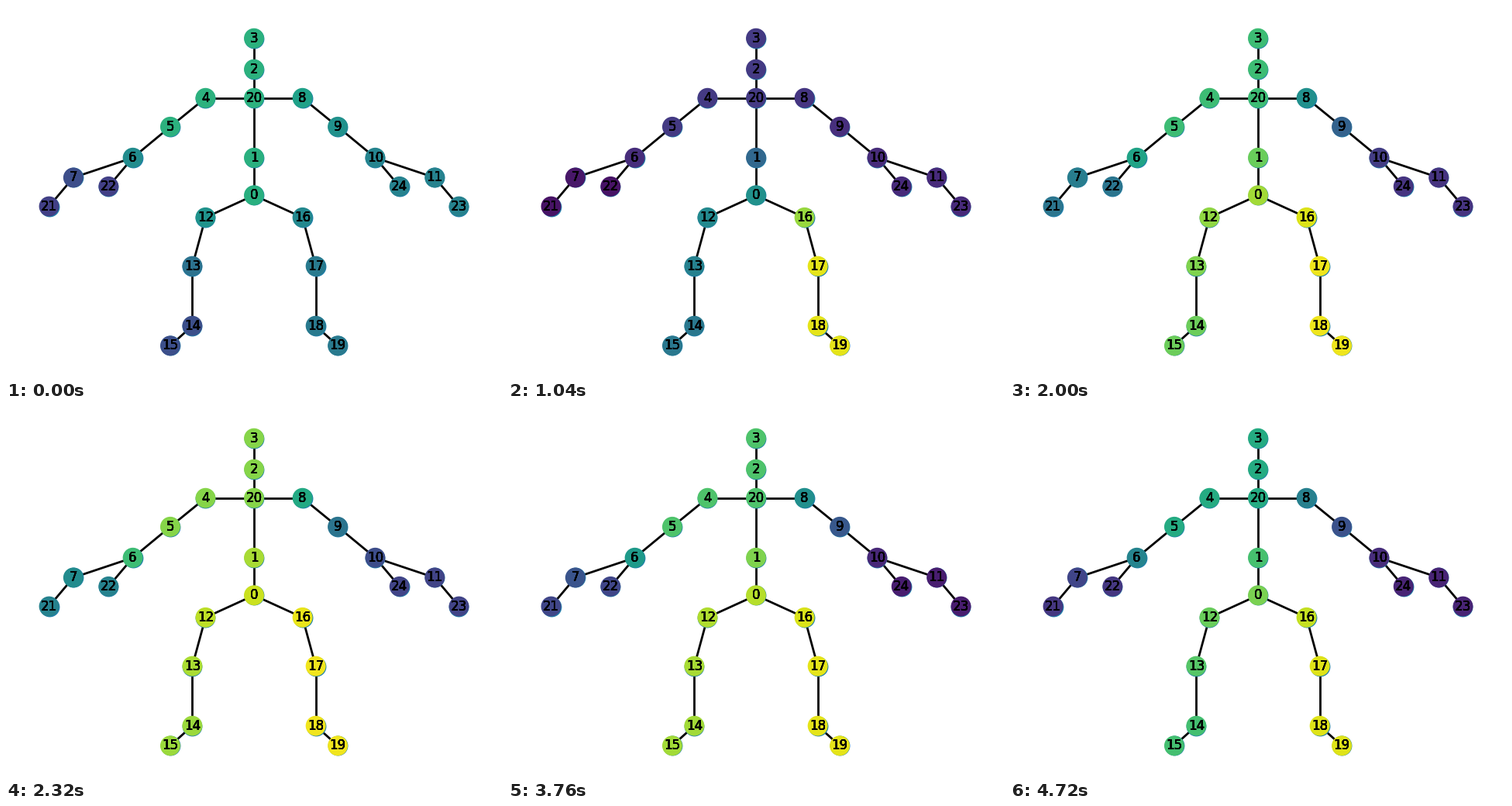
A matplotlib script for the animation above (4800 ms loop, 640 by 480 pixels).

```python
from itertools import pairwise

import numpy as np
import matplotlib.pyplot as plt
from matplotlib.animation import FuncAnimation
from matplotlib.collections import LineCollection

W, H, DPI = 640, 480, 100
FRAMES, INTERVAL = 60, 80
MARGIN = 1.21      # stage size relative to the skeleton
LAYERS = 7         # stacked labels give heavy, crisp digits

# Skeleton on an integer grid: x outwards from the body axis, y down
SPAN_X, SPAN_Y = 186, 139
SPINE = [(0, 71), (0, 54), (0, 14), (0, 0)]
CHEST = (0, 27)
ARM = [(22, 27), (38, 40), (55, 54), (82, 63), (93, 76), (66, 67)]
LEG = [(22, 81), (28, 103), (28, 130), (38, 139)]

SPINE_IDS, CHEST_ID = [0, 1, 2, 3], 20
LEFT_ARM, RIGHT_ARM = [4, 5, 6, 7, 21, 22], [8, 9, 10, 11, 23, 24]
LEFT_LEG, RIGHT_LEG = [12, 13, 14, 15], [16, 17, 18, 19]

CHAINS = [
    [3, 2, 20, 1, 0],
    [20, *LEFT_ARM[:5]], [6, 22],
    [20, *RIGHT_ARM[:5]], [10, 24],
    [0, *LEFT_LEG], [0, *RIGHT_LEG],
]

# Activity of the main body parts at a few key steps
KEYS = [0, 7, 13, 21, 29, 47, 59]
PARTS = {
    "chest": [.64, .67, .17, .55, .82, .72, .61],
    "hip": [.63, .66, .50, .80, .92, .89, .80],
    "left hand": [.19, .08, .05, .34, .44, .21, .16],
    "right hand": [.44, .47, .12, .10, .20, .08, .10],
    "left foot": [.24, .28, .40, .70, .85, .86, .70],
    "right foot": [.41, .74, .96, .97, .98, .96, .95],
}

# Joints, root part, end part, and how far each joint follows the end
BLENDS = [
    ([2, 3, 20], "chest", "chest", 0),
    ([0, 1], "hip", "chest", [0, .5]),
    (LEFT_ARM, "chest", "left hand", [0, 0, .35, .9, 1, 1]),
    (RIGHT_ARM, "chest", "right hand", [.35, .7, .95, 1, 1, 1]),
    (LEFT_LEG, "hip", "left foot", [.3, .65, 1, 1]),
    (RIGHT_LEG, "hip", "right foot", [.75, 1, 1, 1]),
]


def joint_positions():
    grid = np.zeros((25, 2))
    grid[SPINE_IDS] = SPINE
    grid[CHEST_ID] = CHEST
    for shape, left, right in ((ARM, LEFT_ARM, RIGHT_ARM),
                               (LEG, LEFT_LEG, RIGHT_LEG)):
        grid[left] = np.array(shape) * (-1, 1)
        grid[right] = shape
    unit = np.array([W / SPAN_X, H / SPAN_Y]) / MARGIN
    top = (H - H / MARGIN) / 2
    return grid * unit + (W / 2, top)


def activity(step):
    level = {part: np.interp(step, KEYS, row) for part, row in PARTS.items()}
    values = np.zeros(25)
    for joints, root, end, follow in BLENDS:
        values[joints] = level[root] + np.array(follow) * (level[end] - level[root])
    return values


fig = plt.figure(figsize=(W / DPI, H / DPI), dpi=DPI, facecolor="white")
ax = fig.add_axes([0, 0, 1, 1])
ax.set_xlim(0, W)
ax.set_ylim(H, 0)
ax.axis("off")

pos = joint_positions()
bones = [pos[list(pair)] for chain in CHAINS for pair in pairwise(chain)]
ax.add_collection(LineCollection(bones, colors="black", linewidths=2, zorder=1))

# The plain discs snap to whole pixels and leave a thin blue rim
ax.scatter(*pos.T, s=300, c="#1f80ac", linewidths=1.3, zorder=2)
nodes = ax.scatter(*pos.T, s=300, c=activity(0), cmap="viridis",
                   vmin=0, vmax=1, linewidths=1.3, zorder=3)

for joint, (x, y) in enumerate(pos):
    for _ in range(LAYERS):
        ax.text(x, y, str(joint), size=12, family="DejaVu Sans",
                color="black", ha="center", va="center", zorder=4)


def update(step):
    nodes.set_array(activity(step))
    return (nodes,)


anim = FuncAnimation(fig, update, frames=FRAMES, interval=INTERVAL,
                     repeat=True, repeat_delay=0, blit=False)
plt.show()
```
